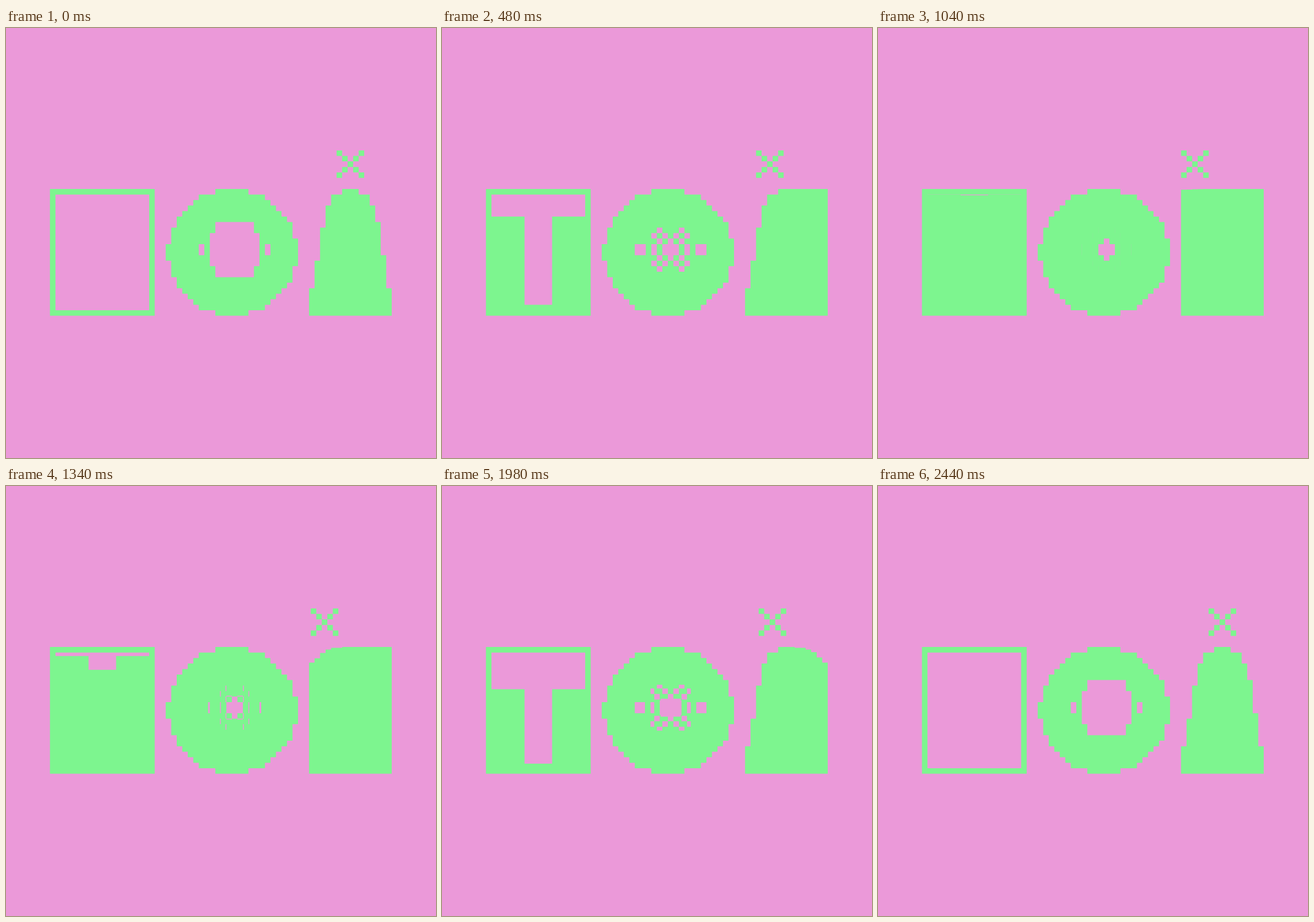
Animation of 748 by 748 pixels, one loop 2.56 s. Source, as an HTML page with a canvas:

```html
<!DOCTYPE html>
<html lang="en">
<head>
<meta charset="utf-8">
<title>Block letters</title>
<style>
html, body { margin: 0; width: 100%; height: 100%; overflow: hidden; background: #eb99d9; }
canvas { display: block; }
</style>
</head>
<body>
<canvas id="stage" width="748" height="748"></canvas>
<script>
const ctx = document.getElementById('stage').getContext('2d');
const PINK = '#eb99d9', GREEN = '#7df58f';
const UNIT = 748 / 78, LEFT = 76.45, TOP = 280.05;
const LOOP = 2560, PHASE = LOOP / 4, MOVE = 510, DELAY = 40, TICK = 20;

// Three poses: 0 open, 1 middle, 2 closed
const ROUTE = [0, 1, 2, 1, 0];

function poseAt(ms) {
  const t = (Math.floor(ms / TICK) * TICK - DELAY + LOOP) % LOOP;
  const i = Math.floor(t / PHASE);
  const p = Math.min(1, (t % PHASE) / MOVE);
  const eased = 1 - (1 - p ** 0.98) ** 4;
  return ROUTE[i] + (ROUTE[i + 1] - ROUTE[i]) * eased;
}

function box(x0, y0, x1, y1) {
  if (x1 - x0 < 1e-4 || y1 - y0 < 1e-4) return;
  ctx.rect(LEFT + x0 * UNIT, TOP + y0 * UNIT, (x1 - x0) * UNIT, (y1 - y0) * UNIT);
}

// The same box in all four quarters of the ring
function mirrored(x0, y0, x1, y1) {
  for (const [a, b] of [[x0, x1], [67 - x1, 67 - x0]]) {
    box(a, y0, b, y1);
    box(a, 22 - y1, b, 22 - y0);
  }
}

function paint(color, shape) {
  ctx.fillStyle = color;
  ctx.beginPath();
  shape();
  ctx.fill();
}

function ring() {
  for (let y = 0; y < 23; y++) {
    const half = 11.68 * Math.sqrt(1 - ((y - 11) / 11.36) ** 2);
    box(33 - Math.round(half), y, 33 + Math.round(half + 0.1), y + 1);
  }
}

// Eyes, centre and a checkerboard that slides outward or shrinks inward
function ringCuts(open, shut) {
  mirrored(27 + 2 * shut, 10, 29 - open, 12);
  box(32 - 3 * open, 10 - 2 * open, 35 + 3 * open, 12 + 2 * open);
  box(32 - 2 * open, 10 - 4 * open, 35 + 2 * open, 12 + 4 * open);

  for (let j = -1; j < 3; j++) {
    for (let i = Math.abs(j); i < 4; i += 2) {
      const x = 33 - i - (i > j ? 3 * open : 0);
      const y = j < 0 ? 10 : 9 - j - 3 * open;
      const left = Math.max(x, 30 - open) + (i > 1 ? shut : 0);
      const top = Math.max(y, 7 - open) + (i === 1 && j === 1 ? shut : 0);
      mirrored(left, top, x + 1, y + (j < 0 ? 2 : 1));
    }
  }
}

function tower(open, shut) {
  const drop = (k, steep) => Math.min(18, Math.round(1 + steep * k ** 2.5));
  box(53, 0, 56, 23);
  for (let k = 0; k < 6; k++) {
    box(52 - k, drop(k, 0.38) * (1 - shut), 53 - k, 23);
    box(56 + k, drop(k, 0.35) * open, 57 + k, 23);
  }
}

function cross(x, y) {
  for (let i = 0; i < 5; i++) {
    box(x + i, y + i, x + i + 1, y + i + 1);
    if (i !== 2) box(x + 4 - i, y + i, x + 5 - i, y + i + 1);
  }
}

function draw(pose) {
  const open = Math.max(0, 1 - pose), shut = Math.max(0, pose - 1);
  ctx.fillStyle = PINK;
  ctx.fillRect(0, 0, 748, 748);

  paint(GREEN, () => {
    box(0, 0, 19, 23);
    ring();
    tower(open, shut);
    cross(49 + 3 * open - 2 * shut, -7);
  });

  paint(PINK, () => {
    box(1, 1, 18, 5 + 17 * open - 4 * shut);
    box(7, 1, 12, 21 + open - 20 * shut);
    ringCuts(open, shut);
  });
}

function frame() {
  draw(poseAt(performance.now() % LOOP));
  requestAnimationFrame(frame);
}
frame();
</script>
</body>
</html>
```
